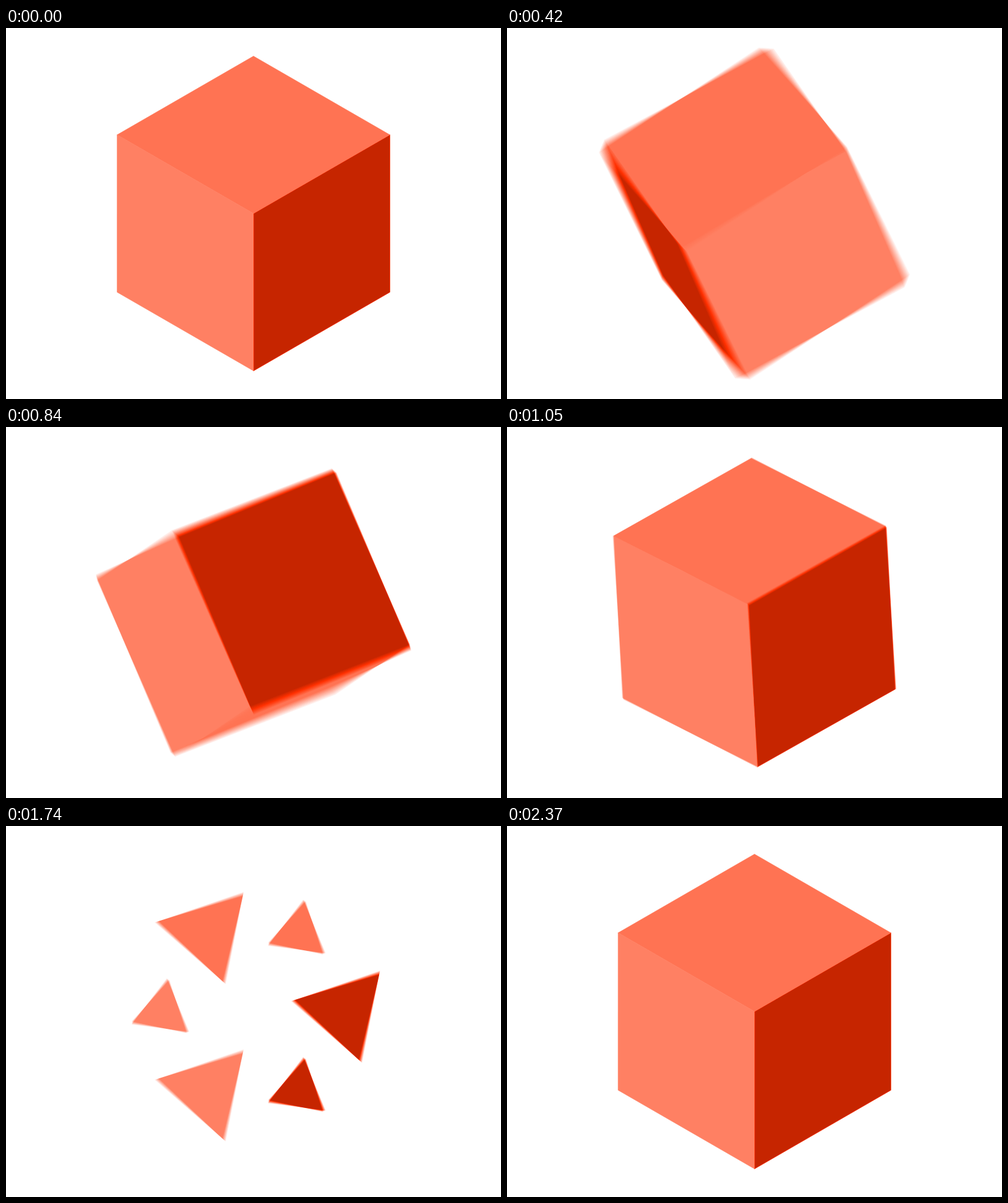
Animation of 800 by 600 pixels, one loop 2.4 s. Source, as an HTML page with a canvas:

```html
<!DOCTYPE html>
<html>
<head>
<meta charset="utf-8">
<style>
  html, body { margin: 0; height: 100%; overflow: hidden; background: #fff; }
  canvas { display: block; }
</style>
</head>
<body>
<canvas id="stage" width="800" height="600"></canvas>
<script>
const W = 800, H = 600, LOOP = 2400, STEP = 30, HALF = LOOP / 2;
const SAMPLES = 14, SHUTTER = 17, SHUTTER_MID = 11;
const RADIUS = 254.5, EDGE = RADIUS * Math.sqrt(1.5), TRI = RADIUS / Math.sqrt(3);
// Grey levels, tinted only after blurring
const DARK = 98.5, TOP = 169, LEFT = 176.5, HUE = 0.187;

const stage = document.getElementById('stage').getContext('2d');
const newLayer = () => {
  const layer = document.createElement('canvas');
  layer.width = W;
  layer.height = H;
  return layer.getContext('2d', { willReadFrequently: true });
};
const ctx = newLayer(), blur = newLayer();
ctx.lineJoin = 'round';

const clamp01 = x => Math.min(1, Math.max(0, x));
const smoother = x => x * x * x * (x * (6 * x - 15) + 10);
const cubic = x => x < 0.5 ? 4 * x ** 3 : 1 - 4 * (1 - x) ** 3;
const mix = (a, u, b, v) => u.map((x, i) => a * x + b * v[i]);

function polygon(points, grey, seam) {
  ctx.beginPath();
  points.forEach(([x, y]) => ctx.lineTo(W / 2 + x, H / 2 + y));
  ctx.closePath();
  ctx.fillStyle = ctx.strokeStyle = `rgb(${grey} ${grey} ${grey})`;
  ctx.fill();
  if (seam) {
    ctx.lineWidth = seam;
    ctx.stroke();
  }
}

// Cube edges in the isometric pose: x right, y down, z towards the viewer
const DEPTH = -1 / Math.sqrt(3);
const AXES = [150, 270, 30].map(deg => {
  const a = deg * Math.PI / 180, r = Math.sqrt(2 / 3);
  return [r * Math.cos(a), -r * Math.sin(a), DEPTH];
});

// Half a turn about the upright axis, overlapped by half a turn about a body axis
function drawCube(t) {
  const e = smoother(t), lead = 0.73 * e * (1 - e);
  const a = Math.PI * (e + lead), b = Math.PI * (e - lead);
  const [e1, e2, e3] = AXES;
  const spun = mix(Math.cos(a), e1, -Math.sin(a), e3);
  const edges = [
    mix(Math.cos(b), spun, Math.sin(b), e2),
    mix(Math.cos(b), e2, -Math.sin(b), spun),
    mix(Math.sin(a), e1, Math.cos(a), e3)
  ];
  edges.forEach((normal, i) => {
    const side = Math.sign(normal[2]) * EDGE / 2, h = EDGE / 2;
    const u = edges[(i + 1) % 3], v = edges[(i + 2) % 3];
    const corners = [[1, 1], [1, -1], [-1, -1], [-1, 1]].map(([p, q]) =>
      mix(1, mix(side, normal, p * h, u), q * h, v));
    polygon(corners, [DARK, TOP, LEFT][i], 0.6);
  });
}

// Alternate triangles shrink and counter-rotate, one set after the other
function drawTriangles(t) {
  for (let k = 0; k < 6; k++) {
    const early = k % 2;
    const u = clamp01((t - (early ? 0.0925 : 0.268)) / 0.65);
    const size = TRI * (1 - Math.sin(Math.PI * u) ** 2 * 2 / 3);
    const turn = (early ? -1 : 1) * cubic(u) * 2 * Math.PI / 3;
    const angle = k * Math.PI / 3;
    const corners = [0, 1, 2].map(j => {
      const c = angle + Math.PI + turn + j * 2 * Math.PI / 3;
      return [TRI * Math.cos(angle) + size * Math.cos(c),
              TRI * Math.sin(angle) + size * Math.sin(c)];
    });
    polygon(corners, [DARK, LEFT, TOP][k >> 1]);
  }
}

function drawScene(ms) {
  ctx.fillStyle = '#fff';
  ctx.fillRect(0, 0, W, H);
  const t = ms / HALF - 1;
  if (t < 0) drawCube(t + 1);
  else if (t < 0.0925 || t > 0.918) drawCube(0);
  else drawTriangles(t);
}

// Use grey as the lightness of one fully saturated hue
function tint(image) {
  const px = image.data;
  for (let i = 0; i < px.length; i += 4) {
    const light = px[i] * 2;
    const high = Math.min(255, light), low = Math.max(0, light - 255);
    px[i] = high;
    px[i + 1] = low + (high - low) * HUE;
    px[i + 2] = low;
  }
  return image;
}

// Motion blur: running average of several moments within one step
function render(start) {
  for (let i = 0; i < SAMPLES; i++) {
    drawScene(start + SHUTTER_MID + SHUTTER * ((i + 0.5) / SAMPLES - 0.5));
    blur.globalAlpha = 1 / (i + 1);
    blur.drawImage(ctx.canvas, 0, 0);
  }
  stage.putImageData(tint(blur.getImageData(0, 0, W, H)), 0, 0);
}

let shown = -1;
function tick() {
  const start = Math.floor(performance.now() % LOOP / STEP) * STEP;
  if (start !== shown) render(shown = start);
  requestAnimationFrame(tick);
}
tick();
</script>
</body>
</html>
```
